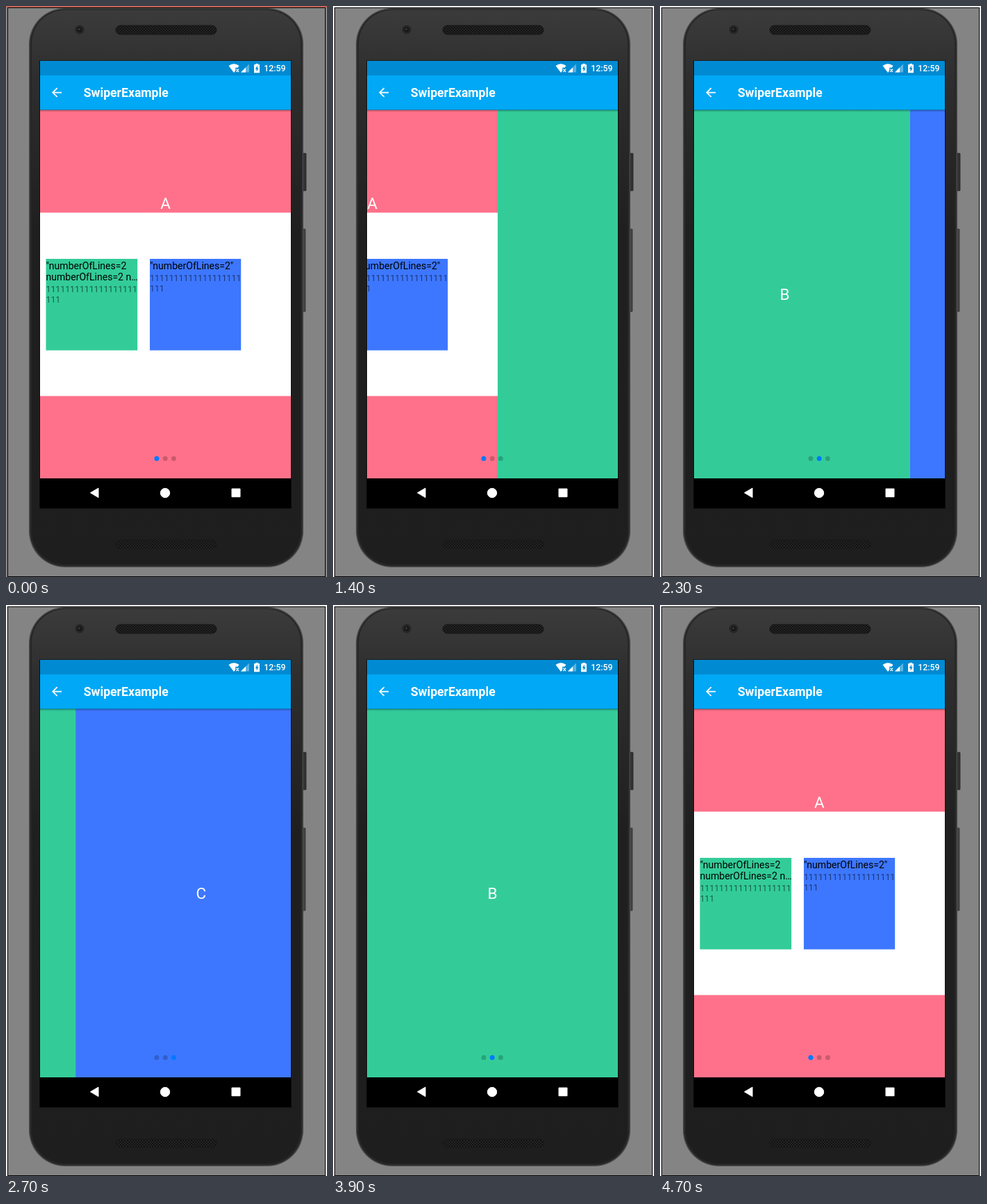
Animation, 462 px wide and 822 px high, one loop 6.1 s. Source, as an HTML page:

```html
<!DOCTYPE html>
<html lang="en">
<head>
<meta charset="utf-8">
<title>Swiper on a phone</title>
<style>
  html, body { margin: 0; width: 100%; height: 100%; overflow: hidden; background: #fff; }
  svg { display: block; width: 100vw; height: 100vh; }
  text { font-family: Roboto, sans-serif; white-space: pre; }
  .letter { font-size: 22.5px; fill: #fff; text-anchor: middle; }
  .label { font-size: 14.05px; fill: #000; }
  .ones { font-size: 12.3px; fill: #000; fill-opacity: .54; }
</style>
</head>
<body>
<svg viewBox="0 0 462 822" xmlns="http://www.w3.org/2000/svg">
  <defs>
    <linearGradient id="body" x1="0" y1="0" x2="0" y2="1">
      <stop offset="0" stop-color="#3b3b3b"/>
      <stop offset=".12" stop-color="#2e2e2e"/>
      <stop offset=".4" stop-color="#1f1f1f"/>
      <stop offset="1" stop-color="#1e1e1e"/>
    </linearGradient>
    <linearGradient id="shade" x1="0" y1="0" x2="0" y2="1">
      <stop offset="0" stop-color="#000" stop-opacity=".28"/>
      <stop offset="1" stop-color="#000" stop-opacity="0"/>
    </linearGradient>
    <pattern id="mesh" width="4" height="4" patternUnits="userSpaceOnUse">
      <rect width="4" height="4" fill="#242424"/>
      <circle cx="1" cy="1" r=".9" fill="#080808"/>
      <circle cx="3" cy="3" r=".9" fill="#080808"/>
    </pattern>
    <clipPath id="view"><rect x="49" y="149.5" width="361" height="530.5"/></clipPath>
  </defs>

  <!-- window edge -->
  <rect id="sides" width="462" height="822"/>
  <rect id="top" width="462" height="2"/>
  <rect x="2.5" y="2.5" width="457" height="819" fill="#848484" stroke="#000"/>

  <!-- phone -->
  <rect x="427" y="212" width="5" height="54" rx="1" fill="#333" stroke="#1c1c1c" stroke-width=".6"/>
  <rect x="427" y="321" width="4" height="119" rx="1" fill="#444" stroke="#2a2a2a" stroke-width=".6"/>
  <rect x="33" y="3" width="395" height="805" rx="52" fill="#484848"/>
  <rect x="34.5" y="4.5" width="392" height="802" rx="50.5" fill="#262626"/>
  <rect x="37" y="6" width="387" height="798" rx="48" fill="url(#body)"/>
  <rect x="48" y="78.5" width="363" height="645" fill="#0c0c0c"/>
  <circle cx="106" cy="34" r="6.5" fill="#252525"/>
  <circle cx="106" cy="34" r="3.5" fill="#171717"/>
  <circle cx="105.5" cy="33.5" r="1.3" fill="#3f4246"/>
  <rect x="158" y="28" width="145" height="13" rx="6.5" fill="url(#mesh)" stroke="#181818"/>
  <rect x="158" y="769" width="145" height="12" rx="6" fill="url(#mesh)" stroke="#181818"/>

  <!-- pages -->
  <g clip-path="url(#view)">
    <g id="pages">
      <rect x="49" y="149" width="361.5" height="532" fill="#ff718a"/>
      <text class="letter" x="229.5" y="291.5">A</text>
      <rect x="49" y="297.5" width="361" height="264" fill="#fff"/>
      <rect x="57.5" y="364" width="131.7" height="131.7" fill="#33cc99"/>
      <text class="label" x="57.5" y="378.8">"numberOfLines=2</text>
      <text class="label" x="57.5" y="395.3">numberOfLines=2 n…</text>
      <text class="ones" x="57.5" y="412">1111111111111111111</text>
      <text class="ones" x="57.5" y="426.5">111</text>
      <rect x="207" y="364" width="131.2" height="131.7" fill="#3d77ff"/>
      <text class="label" x="207" y="378.8">"numberOfLines=2"</text>
      <text class="ones" x="207" y="396">1111111111111111111</text>
      <text class="ones" x="207" y="410.5">111</text>

      <rect x="410" y="149" width="361.5" height="532" fill="#33cc99"/>
      <text class="letter" x="590.5" y="423.2">B</text>

      <rect x="771" y="149" width="361" height="532" fill="#3d77ff"/>
      <text class="letter" x="951.5" y="423.2">C</text>
    </g>
    <g id="dots">
      <circle cx="216.9" cy="651.5" r="3.5"/>
      <circle cx="229.2" cy="651.5" r="3.5"/>
      <circle cx="241.4" cy="651.5" r="3.5"/>
    </g>
    <rect x="49" y="149.5" width="361" height="3.5" fill="url(#shade)"/>
  </g>

  <!-- status bar and header -->
  <rect x="49" y="79" width="361" height="21.5" fill="#008ad2"/>
  <rect x="49" y="100" width="361" height="49.5" fill="#00a8f5"/>
  <g fill="#fff">
    <path d="M320.5 86Q328 80.5 335.5 86L333.6 88.8H330.2V93.2L328 96Z"/>
    <path d="M331.4 90.6l3.6 4.4m0-4.4l-3.6 4.4" fill="none" stroke="#fff" stroke-width="1.2"/>
    <path d="M338 95.5L350 83.5V95.5Z" opacity=".35"/>
    <path d="M338 95.5L345 88.5V95.5Z"/>
    <path d="M359.3 83h3.4v1.3h2.3v12H357v-12h2.3z"/>
    <path d="M361.8 85.8l-3 5h1.8v3.7l3-5h-1.8z" fill="#008ad2"/>
    <text x="371.2" y="94.2" font-size="12.3" font-weight="500">12:59</text>
    <path transform="translate(62.5 114) scale(.878)" d="M20 11H7.83l5.59-5.59L12 4l-8 8 8 8 1.41-1.41L7.83 13H20z"/>
    <text x="111.8" y="131.3" font-size="17.6" font-weight="700">SwiperExample</text>
  </g>

  <!-- navigation bar -->
  <rect x="49" y="680" width="361" height="43" fill="#000"/>
  <g fill="#fff" stroke="#fff" stroke-linejoin="round">
    <path d="M121.5 700.8L133 694V707.6Z"/>
    <circle cx="229" cy="701" r="6.7"/>
    <rect x="325" y="695" width="12" height="11.7"/>
  </g>
</svg>
<script>
  const LOOP = 6100, STEP = 100, PAGE = 361;

  // Finger drags from `first` to `last` px, then the page settles over `settle` ms.
  const swipes = [
    { from: 0, to: 1, start: 1100, first: 30, release: 1400, last: 173, settle: 611 },
    { from: 1, to: 2, start: 2300, first: 50, release: 2600, last: 233, settle: 600 },
    { from: 2, to: 1, start: 3300, first: 17, release: 3500, last: 200, settle: 500 },
    { from: 1, to: 0, start: 4100, first: 17, release: 4300, last: 200, settle: 500 }
  ];

  const $ = id => document.getElementById(id);
  const pages = $('pages'), sides = $('sides'), topEdge = $('top');
  const dots = [...$('dots').children];

  function travel(s, t) {
    if (t <= s.release) {
      return s.first + (s.last - s.first) * (t - s.start) / (s.release - s.start);
    }
    const left = Math.max(0, 1 - (t - s.release) / s.settle);
    return PAGE - (PAGE - s.last) * left ** 5;
  }

  function render(time) {
    const t = Math.floor(time % LOOP / STEP) * STEP;
    let offset = 0, index = 0;
    for (const s of swipes) {
      if (t < s.start) break;
      offset = s.from * PAGE + (s.to - s.from) * travel(s, t);
      index = t > s.release ? s.to : s.from;
    }
    pages.setAttribute('transform', `translate(${-offset.toFixed(2)} 0)`);
    dots.forEach((dot, i) => {
      dot.setAttribute('fill', i === index ? '#007aff' : 'rgba(0,0,0,.2)');
    });
    const opening = t < 1000;
    sides.setAttribute('fill', opening ? '#8a8585' : '#f6e6e8');
    topEdge.setAttribute('fill', opening ? '#c4665a' : '#fff');
  }

  const begin = performance.now();
  function tick() {
    render(performance.now() - begin);
    requestAnimationFrame(tick);
  }
  tick();
</script>
</body>
</html>
```
